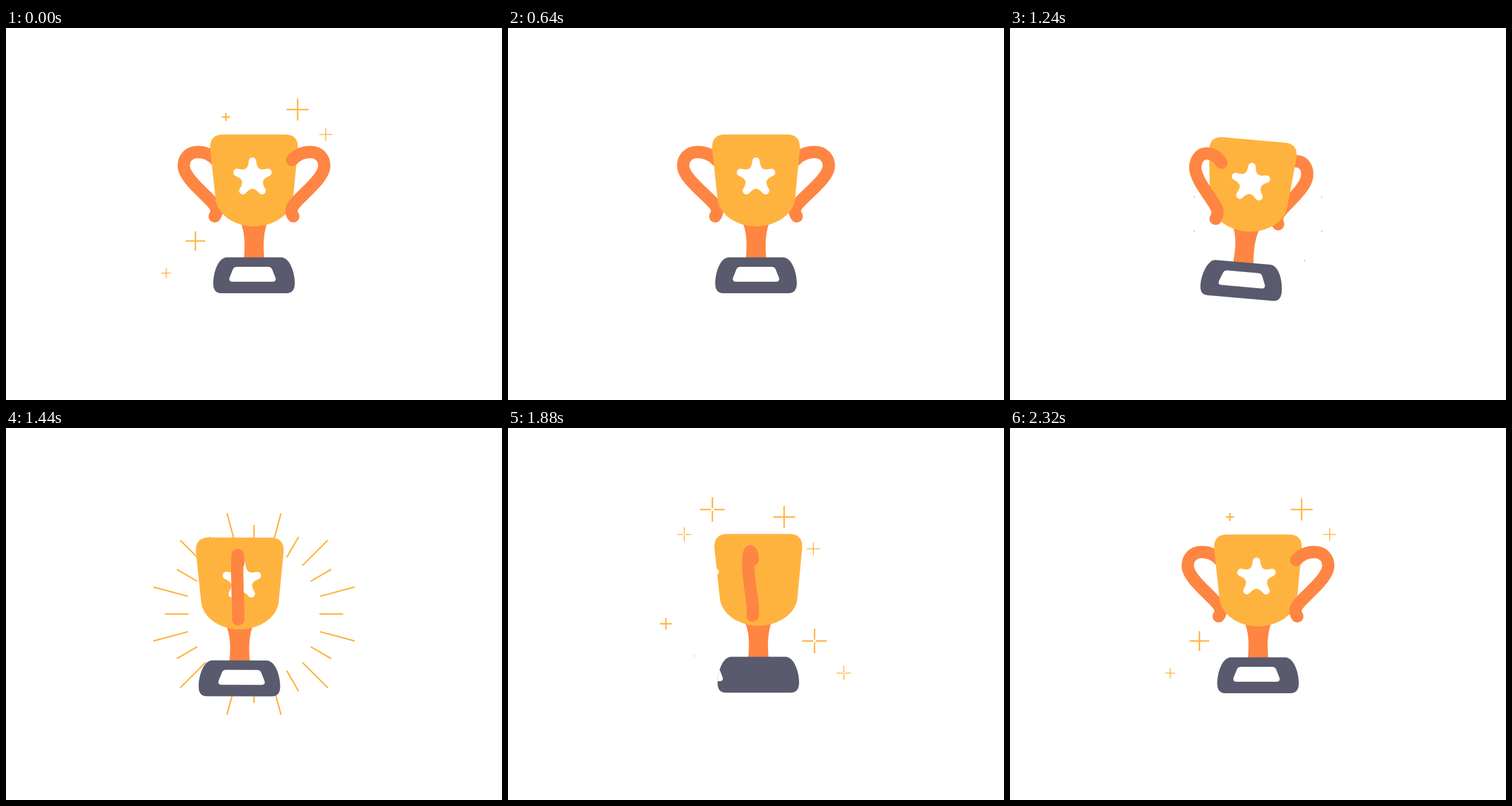
Write an HTML page with a canvas that moves like this. It is 864x648 px and loops after 2360 ms.

```html
<!DOCTYPE html>
<html lang="en">
<head>
<meta charset="utf-8">
<title>Trophy</title>
<style>
  html, body { margin: 0; width: 100%; height: 100%; overflow: hidden; background: #fff; }
  canvas { display: block; }
</style>
</head>
<body>
<canvas id="stage" width="864" height="648"></canvas>
<script>
const ctx = document.getElementById('stage').getContext('2d');
const LOOP = 2360, CYCLE = 2320, STEP = 40;
const CX = 432, CY = 324;
const GOLD = '#ffb33f', ORANGE = '#ff8543', SLATE = '#5a5a6e', WHITE = '#fff';

const cup = new Path2D('M378 185.5H486Q509 185.5 508.5 209L500 298C497 325 466 345.5 432 345.5C398 345.5 368 325 365 298L355.5 209Q355 185.5 378 185.5Z');
const stem = new Path2D('M410 342C417 362 416 380 414.5 402H450C448 380 448 362 454 342Z');
const base = new Path2D('M385 399.5H479C494 399.5 503 425 503 445Q503 462 488 462H375Q361 462 361 445C361 425 370 399.5 385 399.5Z');
const plate = new Path2D('M405 416H459Q464 416 466 420L472 435Q474 442 467 442H397Q390 442 392 435L398 420Q400 416 405 416Z');
// x is measured from the trophy axis so that the handle can turn around it
const handle = new Path2D('M-69 230C-82 216 -97 216 -102 216C-119 216 -127 228 -127 240C-127 262 -84 292 -72 308C-65 316 -68 324 -71 328');
const star = new Path2D();
for (let i = 0; i <= 5; i++) {
  const at = (r, turns) => [CX + r * Math.sin(turns * 2 * Math.PI), 260.4 - r * Math.cos(turns * 2 * Math.PI)];
  if (i) star.quadraticCurveTo(...at(3, (i - 0.5) / 5), ...at(28.4, i / 5));
  else star.moveTo(...at(28.4, 0));
}
star.closePath();

const clamp = x => Math.min(1, Math.max(0, x));
const sigmoid = x => 1 / (1 + Math.exp(-x));

// Offset of the trophy along its flight: [time, x, y]
const flight = [[640, 0, 0], [920, -38, -36], [1000, -10, -36], [1120, 155, -2], [1240, -19, 9], [1680, 6, -1], [2080, -1, 0], [2320, 0, 0]];

// Smooth curve through the flight points; axis 1 is x, axis 2 is y
function offset(t, axis) {
  const slope = i => {
    const a = flight[i - 1], b = flight[i + 1];
    return a && b ? (b[axis] - a[axis]) / (b[0] - a[0]) : 0;
  };
  const i = flight.findIndex(k => k[0] > t);
  if (i < 1) return 0;
  const a = flight[i - 1], b = flight[i];
  const d = b[0] - a[0], u = (t - a[0]) / d, w = 1 - u;
  return w * w * ((1 + 2 * u) * a[axis] + u * d * slope(i - 1))
       + u * u * ((3 - 2 * u) * b[axis] - w * d * slope(i));
}

// One full turn backwards that settles slowly
const tilt = t => t < 640 ? 0 : 2 * Math.PI * Math.exp(-(((t - 640) / 300) ** 2.1));

// Shrinks into the distance and returns
const zoom = t => 1 - 0.8 * Math.sin(Math.PI * clamp((t - 640) / 600)) ** 1.5;

// Turns completed around the axis, continuing across the end of the cycle
const turn = (t, mid, rate) => sigmoid((t - mid) * rate) + sigmoid((t + CYCLE - mid) * rate) - 1;

// Strokes running outward from a centre, from radius r0 to r1
function burst(x, y, count, start, r0, r1) {
  ctx.beginPath();
  for (let i = 0; i < count; i++) {
    const a = start + i * 2 * Math.PI / count, c = Math.cos(a), s = Math.sin(a);
    ctx.moveTo(x + r0 * c, y + r0 * s);
    ctx.lineTo(x + r1 * c, y + r1 * s);
  }
  ctx.stroke();
}

function rays(t, start, angle) {
  const p = (t - start) / 430;
  if (p <= 0 || p >= 1) return;
  ctx.lineWidth = 2.5;
  burst(CX, CY, 12, angle, 114 + 78 * clamp(p / 0.55 - 0.8), 114 + 78 * clamp(p / 0.55));
}

// Sparkles alternate large and small; x is measured from the axis
const near = [[49, 155], [100, 210.5], [-157, 341], [-106.5, 397]];
const far = [[76, 142], [125, 185.5], [-102, 371], [-153, 427]];
const showers = [
  { spots: far, side: -1, start: 1676, lag: 2 },
  { spots: near, side: 1, start: 1700, lag: 85 },
  { spots: far, side: 1, start: 2142, lag: 20 },
  { spots: near, side: -1, start: 2254, lag: 85 }
];

function sparkle(t, x, y, large, start) {
  const p = ((t - start + 2 * CYCLE) % CYCLE) / 400;
  if (p >= 1) return;
  const r = large ? 21.5 : 12.5;
  ctx.lineWidth = large ? 2.5 : 1.6;
  burst(x, y, 4, 0, r * clamp((p - 0.45) / 0.55), r * clamp(p / 0.5));
}

function fill(path, color) {
  ctx.fillStyle = color;
  ctx.fill(path);
}

function inside(mask, dx, paint) {
  ctx.save();
  ctx.clip(mask);
  ctx.translate(dx, 0);
  paint();
  ctx.restore();
}

function drawHandle(side) {
  const path = new Path2D();
  path.addPath(handle, new DOMMatrix([side, 0, 0, 1, CX, 0]));
  ctx.strokeStyle = ORANGE;
  ctx.lineWidth = 21.5;
  ctx.stroke(path);
}

function trophy(t) {
  const angle = 2 * Math.PI * turn(t, 1675, 0.0048);
  const slide = turn(t, 1862, 0.0097);
  const shift = 224 * (slide - Math.round(slide));
  const handles = [1, -1].map(s => ({ side: s * Math.cos(angle), front: s * Math.sin(angle) > 0.035 }));

  ctx.save();
  ctx.translate(CX + offset(t, 1), CY + offset(t, 2));
  ctx.rotate(tilt(t));
  ctx.scale(zoom(t), zoom(t));
  ctx.translate(-CX, -CY);
  ctx.lineCap = ctx.lineJoin = 'round';

  handles.filter(h => !h.front).forEach(h => drawHandle(h.side));
  fill(stem, ORANGE);
  fill(cup, GOLD);
  fill(base, SLATE);
  inside(base, shift, () => fill(plate, WHITE));
  inside(cup, shift, () => {
    fill(star, WHITE);
    ctx.strokeStyle = WHITE;
    ctx.lineWidth = 13;
    ctx.stroke(star);
  });
  handles.filter(h => h.front).forEach(h => drawHandle(h.side));
  ctx.restore();
}

function draw(now) {
  const t = Math.floor((now % LOOP) / STEP) * STEP % CYCLE;
  ctx.fillStyle = WHITE;
  ctx.fillRect(0, 0, 864, 648);
  ctx.strokeStyle = GOLD;
  rays(t, 1235, Math.PI / 12);
  rays(t, 1315, 0);
  for (const { spots, side, start, lag } of showers) {
    spots.forEach(([x, y], i) => sparkle(t, CX + side * x, y, i % 2 === 0, start + lag * Math.max(0, i - 1)));
  }
  trophy(t);
}

const begin = performance.now();
function frame() {
  draw(performance.now() - begin);
  requestAnimationFrame(frame);
}
frame();
</script>
</body>
</html>
```
